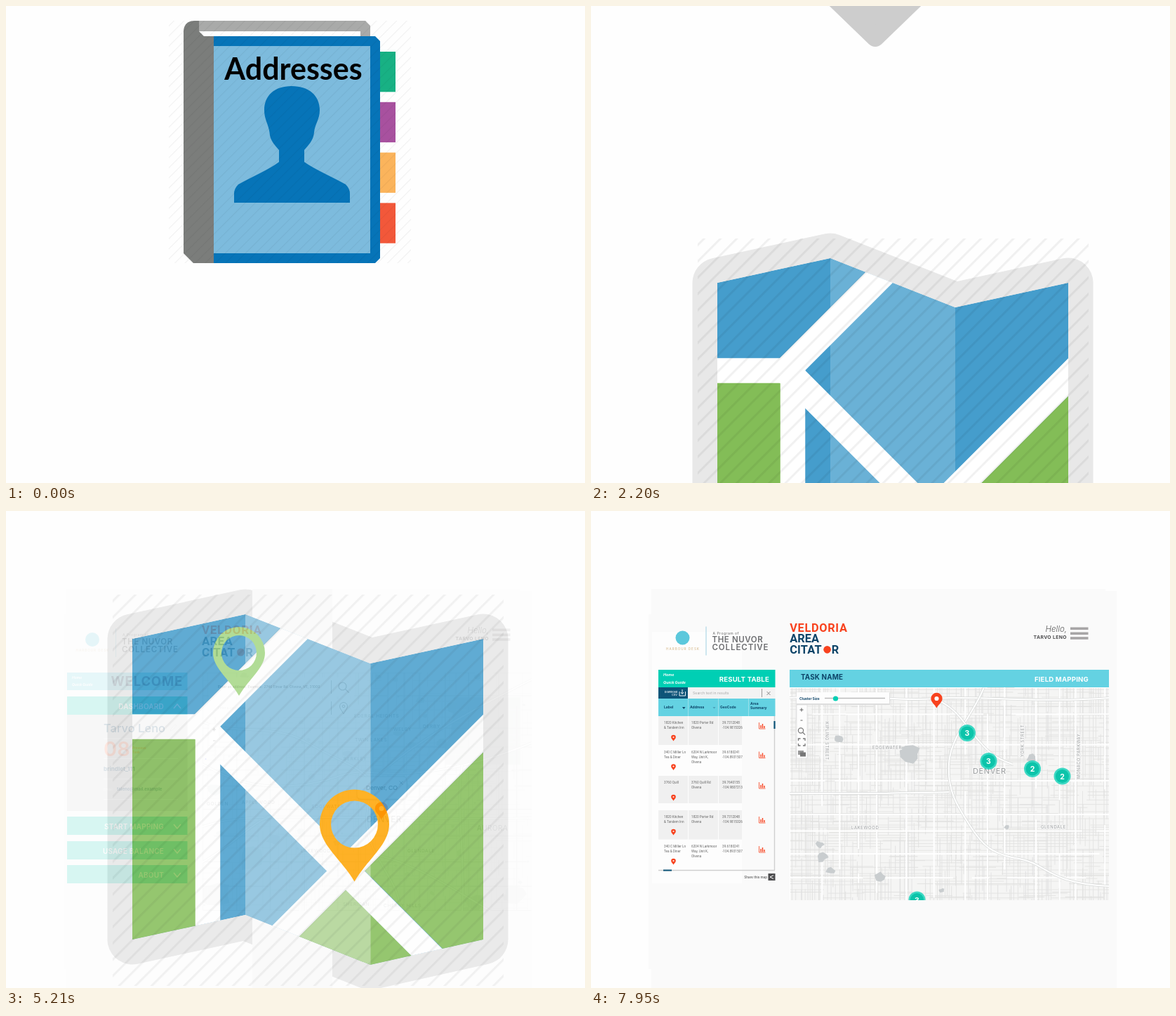
These frames come from a looping animation (825 by 679 pixels, 8000 ms). An HTML page:

```html
<!DOCTYPE html>
<html lang="en">
<head>
<meta charset="utf-8">
<title>Address mapping</title>
<style>
html, body { margin: 0; width: 100%; height: 100%; overflow: hidden; background: #fefefe; }
svg { display: block; }
text { font-family: Inter, sans-serif; font-weight: 700; white-space: pre; }
.wordmark text { font-family: Roboto, sans-serif; }
</style>
</head>
<body>
<svg id="stage" width="100%" height="100%" viewBox="0 0 825 679"></svg>
<script>
const NAVY = '#0d4468', TEAL = '#00cfb4', SKY = '#64d2e2', RED = '#f8421e', BLUE = '#0674b8';

// ---------- markup helpers ----------
const rect = (x, y, w, h, fill, extra = '') =>
  `<rect x="${x}" y="${y}" width="${w}" height="${h}" fill="${fill}" ${extra}/>`;
const path = (d, fill, extra = '') => `<path d="${d}" fill="${fill}" ${extra}/>`;
const line = (d, color, width = 1, extra = '') =>
  path(d, 'none', `stroke="${color}" stroke-width="${width}" ${extra}`);
const circle = (x, y, r, fill, extra = '') => `<circle cx="${x}" cy="${y}" r="${r}" fill="${fill}" ${extra}/>`;
const text = (x, y, size, str, fill, extra = '') =>
  `<text x="${x}" y="${y}" font-size="${size}" fill="${fill}" ${extra}>${str}</text>`;
const group = (body, extra = '') => `<g ${extra}>${body}</g>`;
const offset = (x, y) => `transform="translate(${x} ${y})"`;
const spaced = n => ` letter-spacing="${n}" `;
const weight = n => ` style="font-weight:${n}" `;
const END = 'text-anchor="end"', MID = 'text-anchor="middle"', ITALIC = 'font-style="italic"';

const pin = (x, y, scale, fill, hole = 25) =>
  path(`M0 61C-13 38-37 22-37 0A37 37 0 0 1 37 0C37 22 13 38 0 61Z` +
    `M${hole} 0A${hole} ${hole} 0 1 0 ${-hole} 0A${hole} ${hole} 0 1 0 ${hole} 0Z`,
    fill, `fill-rule="evenodd" transform="translate(${x} ${y}) scale(${scale})"`);

const hatch = (id, gap, width) =>
  `<pattern id="${id}" width="${gap}" height="${gap}" patternUnits="userSpaceOnUse" patternTransform="rotate(45)">` +
  rect(0, 0, width, gap, '#000', 'opacity=".055"') + '</pattern>';

function seeded(seed) {
  return () => (seed = (seed * 16807) % 2147483647) / 2147483647;
}

// ---------- book, arrow and folded map ----------
const book =
  path('M253 37Q253 21 269 21H275V36L282 43H296V366H267L253 352Z', '#7b7d7b') +
  path('M275 21H512L519 28V43H505V36H275Z', '#a9aaa9') +
  path('M296 43H526L533 50V359L526 366H296Z', BLUE) +
  rect(296, 57, 223, 295, '#7dbbdd') +
  ['#18b184', '#a8519f', '#fbb45c', '#f2583a'].map((c, i) => rect(533, 65 + i * 71.8, 22, 57.3, c)).join('') +
  path('M407 114C432 114 447 128 447 148C447 162 440 168 439 180C438 192 430 199 425 205V222' +
    'C440 233 465 243 484 254Q490 260 490 267V280H325V267Q325 260 331 254C350 243 375 233 389 222V205' +
    'C384 199 376 192 375.5 180C374 168 368 162 368 148C368 128 382 114 407 114Z', BLUE) +
  rect(232, 21, 345, 345, 'url(#thin)') +
  text(409.5, 105, 43, 'Addresses', '#000', MID + ' style="font-family:Lato,sans-serif"');

const arrow = path('M360 438H449V534H494L405 620L316 534H360Z', '#cdcdcd',
  'id="arrow" stroke="#cdcdcd" stroke-width="26" stroke-linejoin="round"');

const SHEET = 'M180 182L341 147L519 217L680 182V610L519 646L341 575L180 610Z';
const foldedMap =
  path(SHEET, '#e8e8e8', 'stroke="#e8e8e8" stroke-width="71" stroke-linejoin="round"') +
  rect(351, 111, 114, 568, '#fafafa', 'class="veil"') +
  group(
    path(SHEET, '#459dcc') +
    path('M180 310H270V640H180ZM511 512L680 343V650H649ZM484 539L400 623V700H645Z', '#83bd57') +
    line('M450 135L278 307M278 306.5L640 668.5M700 296.5L370 626.5', '#fff', 38) +
    line('M180 307H287.5V640', '#fff', 35.5) +
    rect(341, 140, 178, 520, '#fff', 'opacity=".2"') +
    rect(341, 140, 179, 520, '#fafafa', 'class="veil" opacity=".2"'), 'clip-path="url(#sheet)"') +
  rect(152, 119, 557, 557, 'url(#wide)');

// ---------- street maps ----------
function streets(x0, y0, w, h, step, chance, seed) {
  const rnd = seeded(seed);
  let d = '';
  for (const [across, along, vertical] of [[w, h, true], [h, w, false]]) {
    for (let a = 0; a < across; a += step * (0.6 + rnd() * 0.8)) {
      for (let b = 0; b < along;) {
        const len = 12 + rnd() * 45;
        if (rnd() < chance) {
          d += vertical ? `M${(x0 + a).toFixed(1)} ${(y0 + b).toFixed(1)}v${len.toFixed(1)}`
                        : `M${(x0 + b).toFixed(1)} ${(y0 + a).toFixed(1)}h${len.toFixed(1)}`;
        }
        b += len;
      }
    }
  }
  return d;
}

function blob(x, y, r, fill, rnd) {
  let d = '';
  for (let i = 0; i < 9; i++) {
    const a = i * Math.PI / 4.5, q = r * (0.65 + rnd() * 0.6);
    d += `${i ? 'L' : 'M'}${(x + q * Math.cos(a)).toFixed(1)} ${(y + q * 0.8 * Math.sin(a)).toFixed(1)}`;
  }
  return path(d + 'Z', fill);
}

const highway = d => line(d, '#dadcdb', 3.6) + line(d, '#fff', 2);
const label = (x, y, str, size = 6.6, extra = '') =>
  text(x, y, size, str, '#9a9d9e',
    `${weight(400)}${spaced(0.6)} paint-order="stroke" stroke="#fafafa" stroke-width="1.5" ${extra}`);
const view = (x, y, w, h, body) =>
  `<svg x="${x}" y="${y}" width="${w}" height="${h}" viewBox="${x} ${y} ${w} ${h}">${body}</svg>`;

function cityMap() {
  const rnd = seeded(77);
  let parks = '';
  for (let i = 0; i < 55; i++) {
    parks += blob(280 + rnd() * 469, 230 + rnd() * 339, 1.5 + rnd() * rnd() * 9, '#e3e6e5', rnd);
  }
  return rect(280, 230, 469, 339, '#fafafa') +
    path('M638 265H733V361H626V335L634 318Z', '#e9ebea') + parks +
    blob(349, 493, 21, '#e6e9e8', rnd) + blob(299, 545, 24, '#e6e9e8', rnd) +
    blob(668, 557, 16, '#dfe3e3', rnd) + blob(725, 545, 18, '#e6e9e8', rnd) +
    line(streets(280, 230, 469, 339, 9, 0.38, 11), '#ededec', 0.8) +
    line(streets(400, 330, 300, 240, 6, 0.4, 29), '#ebebea', 0.7) +
    line(streets(280, 230, 469, 339, 36, 0.85, 5), '#dfe1e0', 1.1) +
    [
      'M280 449C340 430 400 437 470 436S620 440 749 437',
      'M521 230C514 290 525 340 520 385S506 450 528 490S560 540 562 569',
      'M280 360C330 390 370 395 420 390S480 368 520 372S640 376 749 330',
      'M280 500C330 470 350 445 372 437M520 385C580 330 650 290 749 240',
      'M528 490C580 500 640 540 690 569M650 361C640 420 655 490 650 569',
      'M280 300C320 320 380 300 430 330S500 360 520 385'
    ].map(highway).join('') +
    label(496, 294, 'EDERAL HEIGHTS') + label(552, 313, 'WELBY') + label(594, 309, 'DERBY') +
    label(497, 328, 'TWIN LAKES') + label(481, 355, 'BERKLEY') + label(436, 423, 'EDGEWATER') +
    label(336, 417, 'APPLEWOOD') + label(286, 419, 'GOLDEN') + label(514, 443, 'DENVER', 11.5) +
    label(671, 455, 'AURORA', 9.8) + label(572, 486, 'GLENDALE') + label(420, 486, 'LAKEWOOD') +
    label(480, 562, 'SHERIDAN') + label(538, 564, 'CHERRY HILLS');
}

function fieldMap() {
  const rnd = seeded(41);
  const lakes = [[456, 346, 14], [446, 340, 6], [352, 325, 7], [326, 475, 6], [329, 493, 8], [341, 512, 6],
    [411, 520, 8], [500, 540, 4], [592, 450, 4], [628, 352, 7]];
  return rect(283, 251, 455, 303, '#f5f5f4') +
    line(streets(283, 251, 455, 303, 5, 0.62, 17), '#e4e4e3', 0.9) +
    line(streets(283, 251, 455, 303, 9, 0.5, 23), '#e0e0df', 0.9) +
    line(streets(283, 251, 455, 303, 38, 0.9, 8), '#fff', 2) +
    lakes.map(([x, y, r]) => blob(x, y, r, '#c9cdcf', rnd)).join('') +
    [
      'M283 266C380 258 430 272 490 267S640 274 738 266',
      'M560 251C545 290 512 320 510 360S522 420 540 448S570 488 610 495S650 530 738 534',
      'M283 402H420C450 400 480 402 510 400',
      'M490 267C520 280 530 300 545 318S570 350 600 360'
    ].map(highway).join('') +
    label(401, 339, 'EDGEWATER', 6) + label(544, 374, 'DENVER', 11) +
    label(371, 453, 'LAKEWOOD', 6) + label(641, 452, 'GLENDALE', 6) +
    label(0, 0, 'KIPLING STREET', 5.8, 'transform="translate(334 300) rotate(90)"') +
    label(0, 0, 'YORK STREET', 5.8, 'transform="translate(617 350) rotate(-90)"') +
    label(0, 0, 'MONACO PARKWAY', 5.8, 'transform="translate(697 381) rotate(-90)"');
}

// ---------- dashboard parts ----------
const partner =
  circle(123, 183, 10, '#5cc8dc') +
  text(99.5, 200, 4.6, 'HARBOUR DESK', '#d8bd92', weight(500) + spaced(1)) +
  line('M156.5 167V208', '#9fd0e2') +
  text(166, 178, 5, 'A Program of', '#777', weight(500) + spaced(0.5)) +
  text(165, 189.5, 11.5, 'THE NUVOR', '#6d6e71', weight(600) + spaced(0.6)) +
  text(165, 200.5, 11.5, 'COLLECTIVE', '#6d6e71', weight(600) + spaced(0.9));

const wordmark = group(
  text(279, 174.5, 17, 'VELDORIA', RED, spaced(0.7)) +
  text(279, 190.5, 17, 'AREA', NAVY, spaced(0.1)) +
  text(279, 207, 17, 'CITAT', NAVY, spaced(0.2)) +
  circle(334.5, 201, 5.5, RED) + text(341, 207, 17, 'R', NAVY), 'class="wordmark"');

const account =
  text(688, 174, 11.5, 'Hello,', '#5b5b5b', `${END} ${ITALIC} ${weight(300)}`) +
  text(688, 184, 6.8, 'TARVO LENO', '#4d4d4f', END + spaced(0.4)) +
  [167.5, 174.5, 181.2].map(y => rect(693, y, 25.5, 3.6, '#a7a5a6')).join('');

const magnifier = (x, y, r) =>
  line(`M${x + r} ${y}A${r} ${r} 0 1 0 ${x - r} ${y}A${r} ${r} 0 1 0 ${x + r} ${y}` +
    `M${x + r * 0.7} ${y + r * 0.7}l${r} ${r}`, '#777', 1.2);
const cross = (x, y, r) =>
  line(`M${x - r} ${y - r}l${2 * r} ${2 * r}M${x + r} ${y - r}l${-2 * r} ${2 * r}`, '#888', 1);

const menuBar = (y, name, up) => rect(87, y, 171.5, 26, TEAL) +
  text(225, y + 18, 10, name, '#fff', END + weight(600) + spaced(0.2)) +
  line(up ? `M239 ${y + 17}l5-6l5 6` : `M239 ${y + 11}l5 6l5-6`, '#fff', 1.5);

const sidebar =
  rect(87, 230, 171.5, 25, SKY) +
  text(94, 239, 5, 'Home', '#fff', ITALIC) + text(94, 249, 5, 'Quick Guide', '#fff', ITALIC) +
  text(252, 249, 18.5, 'WELCOME', NAVY, END + spaced(0.8)) +
  rect(87, 290, 171.5, 137, '#d4d4d4') +
  menuBar(264, 'DASHBOARD', true) + menuBar(435, 'START MAPPING') +
  menuBar(470, 'USAGE BALANCE') + menuBar(504, 'ABOUT') +
  text(139, 314.5, 16.5, 'Tarvo Leno', NAVY, weight(500)) +
  line('M234 313l1-3l6-6l2 2l-6 6z', '#bbb', 0.8) +
  line('M139 324H245M139 352.5H245M139 381.5H245M139 410.5H245', '#f0f0f0') +
  text(139, 349, 29, '08', '#f9683d', weight(600)) +
  text(180, 339, 4.6, 'Previous', '#f9683d') + text(180, 345, 4.6, 'Task', '#f9683d') +
  text(139, 370, 8.2, 'brindlet_111', NAVY) +
  text(139, 398, 5, 'Email', '#eee', weight(500)) + text(158, 398, 6.1, 'taleno@mail.example', NAVY);

const searchPanel =
  rect(289, 237, 207, 27, '#fbfbfb') + rect(289, 268, 207, 25, '#fbfbfb') +
  text(302, 252, 4.9, 'Enter an address. Example: 2746 Elmar Rd. Olvena, VE, 31000', '#555', weight(600)) +
  text(302, 282, 4.6, 'Enter a coordinate', '#d4d4d4', weight(500)) +
  line('M463.5 241V260M463.5 271V290', '#999') + magnifier(479.5, 249.5, 5.5) +
  path('M481 289C479 284 475.5 282 475.5 278A5.5 5.5 0 0 1 486.5 278C486.5 282 483 284 481 289Z', 'none', 'stroke="#777"') +
  circle(481, 278, 1.8, 'none', 'stroke="#777"') +
  rect(289, 303, 15, 31, '#fff', 'stroke="#e4e4e4" stroke-width=".7"') +
  line('M294 311h5M296.5 308.5v5M295 327h3.5', '#555', 1.2) + circle(284.5, 353, 0.8, '#33f');

const popup =
  rect(500, 380, 72, 32, '#bbb', 'rx="6" opacity=".55"') +
  path('M506 378H565Q571 378 571 384V404Q571 410 565 410H542L535 418L528 410H506Q500 410 500 404V384Q500 378 506 378Z',
    '#fdfdfd', 'stroke="#c8c8c8" stroke-width=".8"') +
  text(535.5, 397, 8.6, 'Denver, CO', '#333', MID + ' style="font-family:Liberation Sans,sans-serif;font-weight:400"') +
  cross(563, 387, 2.5) + circle(535, 423.5, 5, '#fff') + pin(535, 423.5, 0.25, RED, 14);

const panel = path('M86 111H733V114H749V679H86V652H82V147H86Z', '#fafafa');
const dashboard = panel + partner + wordmark + account + sidebar +
  view(280, 230, 469, 339, cityMap()) + searchPanel + popup;

// ---------- results screen ----------
const kitchen = ['1820 Kitchen|&amp; Tandem Inn', '1820 Porter Rd|Olvena', '39.7312048|-104.9815326'];
const diner = ['340 C Miller Ln|Tea &amp; Diner', '6204 N Larkmoor|Way, Unit K,|Olvena', '39.6180241|-104.8931507'];
const quill = ['3760 Quill', '3760 Quill Rd|Olvena', '39.7640155|-104.9807213'];

function resultRow([y, h, cells], i) {
  const shade = i === 1 || i === 4 ? '#fdfdfd' : '#f0f0f0';
  const cell = (x, str) => str.split('|').map((s, n) =>
    text(x, y + 11 + n * 7, 4.7, s, '#666', 'style="font-family:Roboto,sans-serif;font-weight:400"')).join('');
  return rect(96, y, 42, h, shade) + rect(139, y, 42, h, shade) + rect(182, y, 33, h, shade) +
    cell(104, cells[0]) + cell(143, cells[1]) + cell(187, cells[2]) +
    pin(117.5, y + 30, 0.09, RED, 12) +
    line(`M239.5 ${y + 9}v9h9`, RED, 0.8) +
    line(`M242 ${y + 17}v-4M244.5 ${y + 17}v-6M247 ${y + 17}v-3`, RED, 1.4);
}

const heading = (x, y, str) => text(x, y, 5, str, NAVY);
const resultTable =
  rect(87, 172, 128, 358, '#fdfdfd') +
  rect(96, 226, 166.5, 25, TEAL) +
  text(103, 235, 5.4, 'Home', '#fff', ITALIC) + text(103, 246, 5.4, 'Quick Guide', '#fff', ITALIC) +
  text(254, 242.5, 9.6, 'RESULT TABLE', '#fff', END + spaced(0.2)) +
  rect(96, 251, 42, 16, '#0d5478') + rect(138, 251, 124.5, 16, '#f3f3f3') +
  text(123, 258.5, 3.8, 'Download', '#fff', END + weight(500)) + text(123, 263, 3.8, 'CSV', '#fff', END + weight(500)) +
  line('M130 254v6m-2-2l2 2.5l2-2.5M126 257v6h8.5v-6', '#fff', 0.9) +
  text(145, 261, 5.2, 'Search text in results', '#aaa', weight(400)) +
  line('M243.5 253V265', '#999') + cross(253, 259.5, 2.5) +
  rect(96, 267, 166.5, 25, SKY) + line('M138.5 267V292M181.5 267V292M224.5 267V292', '#a5e4ec', 0.8) +
  heading(104, 281, 'Label') + heading(141, 281, 'Address') + heading(184, 281, 'GeoCode') +
  heading(227, 275.5, 'Area') + heading(227, 281.5, 'Summary') +
  path('M130 279h4.5l-2.25 3z', NAVY) + path('M173.5 279h4l-2 2.5z', '#4a9fb8') +
  [[292, 41, kitchen], [333.5, 41.5, diner], [377, 39, quill], [426, 41.5, kitchen], [468, 43, diner]]
    .map(resultRow).join('') +
  line('M261.5 292V511M96 511.5H262', '#cfcfcf', 1.4) +
  line('M261.5 299V310M103 511.5H115', '#0d5478', 2.2) +
  text(251, 522.5, 4.6, 'Share this map', '#555', END + weight(500)) +
  rect(252.5, 516, 10, 10, '#4d4d4f') + line('M260 518.5l-5 2.5l5 2.5', '#fff', 1);

const cluster = (x, y, n) => circle(x, y, 12, TEAL, 'opacity=".75"') + circle(x, y, 9.6, '#0cc4aa') +
  text(x, y + 4, 10.5, n, '#fff', MID);

const fieldTools =
  rect(293, 259, 133, 17, '#ddd') + rect(293, 258, 132, 16, '#fdfdfd') +
  text(297, 268.5, 4.9, 'Cluster Size', NAVY) + line('M333 266.5H419', '#bbb', 1.4) + circle(348.5, 267, 3.6, TEAL) +
  rect(293, 276, 15, 76, '#fdfdfd', 'stroke="#ddd" stroke-width=".7"') +
  line('M297.5 283h5M300 280.5v5M298.5 298h3', '#666', 1.1) + magnifier(299, 312.5, 3.6) +
  line('M295.5 327v-3h3M302 324h3v3M305 331v3h-3M298.5 334h-3v-3', '#777', 1.3) +
  rect(295, 341, 8, 6, '#999') + rect(298, 343.5, 8, 6, '#777');

const results = panel + resultTable + group(partner, offset(7.5, -2.5)) +
  group(wordmark, 'transform="translate(14.8 4) scale(.962)"') + group(account, offset(-10, -2)) +
  rect(283, 226, 455, 25, SKY) +
  text(299, 240, 9.8, 'TASK NAME', NAVY, spaced(0.2)) +
  text(709, 243, 9.6, 'FIELD MAPPING', '#fff', END + spaced(0.2)) +
  view(283, 251, 455, 303, fieldMap() + cluster(536, 316, 3) + cluster(566.5, 356, 3) +
    cluster(629, 367, 2) + cluster(671.5, 377.5, 2) + cluster(464.5, 553.5, 3)) +
  fieldTools + circle(492.5, 267, 4, '#fff') + pin(492.5, 267, 0.22, RED, 14);

// ---------- stage ----------
document.getElementById('stage').innerHTML =
  `<defs>${hatch('thin', 10.2, 1)}${hatch('wide', 16.4, 3)}<clipPath id="sheet"><path d="${SHEET}"/></clipPath></defs>` +
  group(book + arrow, 'id="intro"') + group(foldedMap, 'id="map"') +
  group(pin(332, 202, 1, '#a5d785'), 'id="greenPin"') +
  group(pin(496.5, 446, 1.338, '#ffa500'), 'id="orangePin"') +
  group(dashboard, 'id="dashboard"') + group(results, 'id="results"');

const part = id => document.getElementById(id);
const move = (id, y) => part(id).setAttribute('transform', `translate(0 ${y.toFixed(2)})`);
const fade = (id, alpha) => {
  part(id).setAttribute('opacity', alpha);
  part(id).style.display = alpha > 0 ? '' : 'none';
};

// Linear interpolation through [time, value] pairs, held at both ends.
function follow(t, keys) {
  if (t <= keys[0][0]) return keys[0][1];
  for (let i = 1; i < keys.length; i++) {
    const [t0, v0] = keys[i - 1], [t1, v1] = keys[i];
    if (t <= t1) return v0 + (v1 - v0) * (t - t0) / (t1 - t0);
  }
  return keys[keys.length - 1][1];
}

// The picture only changes at these moments.
const TICKS = [0, 960, 1230, 1350, 1500, 1650, 1770, 1920, 2050, 2200, 2320, 2470, 2620, 2750, 2900, 3060, 3210, 3330,
  3480, 3600, 3900, 4020, 4170, 4320, 4450, 4570, 5090, 5210, 5360, 5510, 5630, 5780, 7340, 7490, 7640, 7800, 7950];
const SCROLL = 787;

function render(now) {
  const time = now % 8000;
  const t = TICKS.filter(tick => tick <= time).pop();

  const p = Math.min(1, Math.max(0, (t - 1270) / 1425));
  const scroll = SCROLL * (1 - Math.cos(Math.PI * p)) / 2;
  move('intro', -scroll);
  move('map', SCROLL - scroll);
  fade('arrow', t >= 960 ? 1 : 0);

  move('greenPin', follow(t, [[2900, -70], [3060, -52], [3330, -18], [3480, 0]]));
  fade('greenPin', t < 2900 ? 0 : follow(t, [[2900, 0.17], [3600, 1]]));
  move('orangePin', follow(t, [[3900, -441], [4020, -347], [4170, -213], [4320, -95], [4450, -22], [4570, 0]]));
  fade('orangePin', t >= 3900 ? 1 : 0);

  for (const veil of document.querySelectorAll('.veil')) veil.style.display = t >= 5210 ? '' : 'none';
  fade('dashboard', t < 5090 ? 0 :
    follow(t, [[5090, 0.06], [5210, 0.15], [5360, 0.42], [5510, 0.68], [5630, 0.86], [5780, 1]]));
  fade('results', t < 7340 ? 0 : follow(t, [[7340, 0.12], [7490, 0.4], [7640, 0.72], [7800, 0.96], [7950, 1]]));
}

const start = performance.now();
(function loop() {
  render(Math.max(0, performance.now() - start));
  requestAnimationFrame(loop);
})();
</script>
</body>
</html>
```
